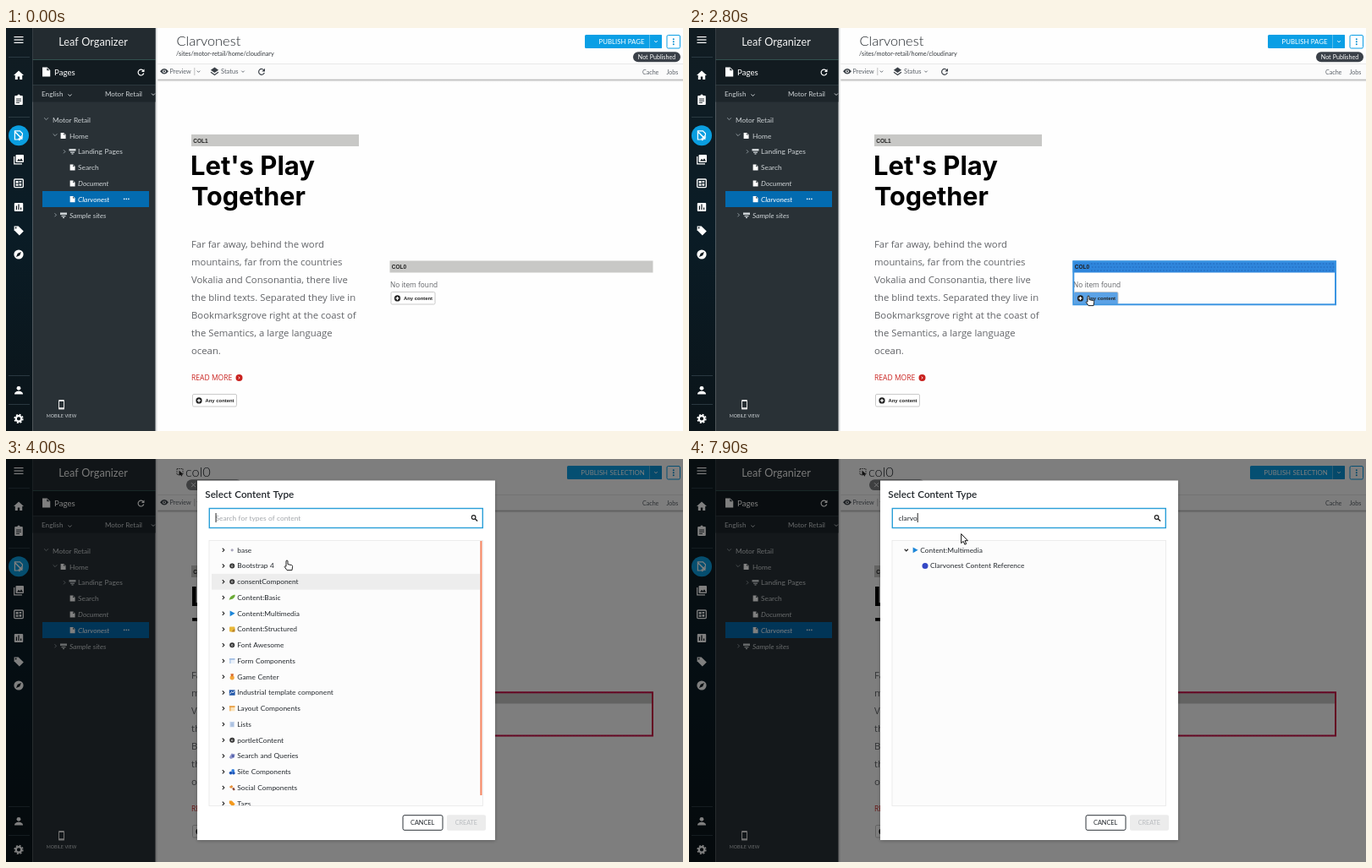
Recreate the animation shown at these times as an HTML page. Size 800 by 477 pixels, loop 8 s.

```html
<!DOCTYPE html>
<html lang="en">
<head>
<meta charset="utf-8">
<title>Content picker</title>
<style>
html, body { margin: 0; width: 100%; height: 100%; overflow: hidden; background: #fff; }
svg { display: block; width: 100%; height: 100%; }
text { font-family: Lato, "Open Sans", sans-serif; word-spacing: .05em; white-space: pre; }
.body { font-family: "Open Sans", "Noto Sans", sans-serif; word-spacing: 0; }
.head { font-family: Inter, sans-serif; font-weight: 700; word-spacing: 0; }
.bold { font-family: "Liberation Sans", Arial, sans-serif; font-weight: 700; word-spacing: 0; }
.it { font-style: italic; }
.semi { font-weight: 600; }
.light { font-weight: 300; }
.mid { text-anchor: middle; }
</style>
</head>
<body>
<svg id="stage" viewBox="0 0 800 477" preserveAspectRatio="none"></svg>
<script>
const LOOP = 8000, ROW = 18.75;
const NAME = 'Clarvonest';

// ---- drawing helpers -------------------------------------------------
const text = (x, y, size, s, fill = '#fff', cls = '', more = '') =>
  `<text x="${x}" y="${y}" font-size="${size}" fill="${fill}" class="${cls}" ${more}>${s}</text>`;
const rect = (x, y, w, h, fill, more = '') =>
  `<rect x="${x}" y="${y}" width="${w}" height="${h}" fill="${fill}" ${more}/>`;
const path = (d, fill, more = '') => `<path d="${d}" fill="${fill}" ${more}/>`;
const line = (d, color, w = 1, more = '') => path(d, 'none', `stroke="${color}" stroke-width="${w}" ${more}`);
const dot = (x, y, r, fill, more = '') => `<circle cx="${x}" cy="${y}" r="${r}" fill="${fill}" ${more}/>`;
const at = (x, y, s) => `<g transform="translate(${x} ${y})">${s}</g>`;
const group = (id, s) => `<g id="${id}">${s}</g>`;
const down = (x, y, c, r = 2, w = 1) => line(`M${x - r} ${y - r / 2}l${r} ${r}l${r} ${-r}`, c, w);
const right = (x, y, c, r = 2, w = 1) => line(`M${x - r / 2} ${y - r}l${r} ${r}l${-r} ${r}`, c, w);
const kebab = (x, y, c) => [-3, 0, 3].map(d => dot(x, y + d, 1, c)).join('');
const page = (x, y, k, fill = '#fff') =>
  at(x, y, `<g transform="scale(${k})">${path('M-3.2-4h4l2.6 2.6V4h-6.6z', fill)}${path('M.6-3.4v2.2h2.2z', '#293136')}</g>`);
const refresh = (x, y, c) => at(x, y, line('M3-1.6A3.4 3.4 0 1 0 3.3 1', c, 1.2) + path('M4-4v3.6h-3.6z', c));
const plus = (x, y, r) => dot(x, y, r, '#222') +
  line(`M${x - r * .55} ${y}h${r * 1.1}M${x} ${y - r * .55}v${r * 1.1}`, '#fff', r * .33);

// ---- left rail and page tree ------------------------------------------
function rail() {
  const w = '#fff';
  const sep = [34, 105, 411, 445].map(y => rect(3, y, 25, .8, '#33424a')).join('');
  return rect(0, 0, 31.5, 477, 'url(#railFill)') + sep +
    [10, 13.4, 16.8].map(y => rect(9.5, y, 11, 1.2, w)).join('') +
    path('M15 50.5l6 5.5h-1.8v5h-3v-3.6h-2.4V61h-3v-5H9z', w) +
    rect(10.2, 80, 9.6, 11, w, 'rx="1"') + dot(15, 80, 1.6, w) +
    line('M12 84h6M12 86.2h6M12 88.4h4', '#0d171d', .9) +
    dot(15, 127.2, 12, '#0a9ee0') +
    path('M10.4 121.8h6l3 3V127l-5 5h-4z', 'none', 'stroke="#fff" stroke-width="1.2"') +
    line('M10.8 123l8.6 8.6M19.8 128.5l-4.5 4.5', w, 1.5) +
    rect(11.5, 150, 9.5, 9, w, 'rx="1"') + line('M9.7 152v8.8H19', w, 1.2) + path('M13 157.4l2-2.6 1.5 1.6 1.5-2.2 2 3.2z', '#0d171d') +
    rect(9.7, 179, 10.6, 9.6, 'none', 'rx="1" stroke="#fff" stroke-width="1.3"') +
    rect(11.6, 181, 3, 2.6, w) + rect(11.6, 184.6, 3, 2.2, w) + rect(15.6, 181, 2.6, 2, w) + rect(15.6, 184, 2.6, 2.8, w) +
    rect(9.8, 207, 10.4, 10, w, 'rx="1"') + line('M12.4 215v-4.5M15 215v-6.4M17.6 215v-2.4', '#0d171d', 1.2) +
    path('M9.6 234.5h5l6.2 6-5 5-6.2-6.2z', w) + dot(11.6, 236.5, .9, '#0d171d') +
    dot(15, 268, 5.6, w) + path('M18 265l-1.8 4.2L12 271l1.8-4.2z', '#0d171d') +
    dot(15, 426.3, 2.4, w) + path('M10 433.4c0-5 10-5 10 0z', w) +
    dot(15, 462.4, 3.2, 'none', 'stroke="#fff" stroke-width="2.2"') +
    dot(15, 462.4, 4.8, 'none', 'stroke="#fff" stroke-width="1.6" stroke-dasharray="2 1.77"');
}

function tree() {
  const c = '#ced3d6', g = '#8e989d';
  const box = (x, y) => rect(x - 4, y - 3, 8, 2.6, c) + rect(x - 2.5, y + .6, 5, 1.2, c) + rect(x - 1, y + 2.4, 2, 1.2, c);
  return rect(31.5, 0, 145, 477, '#293136') + rect(31.5, 0, 145, 37, '#232b30') +
    rect(31.5, 37, 145, 1, '#31504e') + rect(31.5, 38, 145, 29, '#121b20') +
    rect(31.5, 67, 145, 1, '#2c383e') + rect(31.5, 68, 145, 19.5, '#1d252a') +
    text(103, 20.8, 12.7, 'Leaf Organizer', '#f2f2f2', 'mid') +
    page(47.5, 52, 1.4) + text(57, 55.5, 9.7, 'Pages') + refresh(159.5, 52.5, '#fff') +
    text(42, 80.5, 8.2, 'English', c) + down(75.5, 79.5, c) +
    text(117, 80.5, 8, 'Motor Retail', c) + down(174, 78.5, c) +
    down(47.5, 107.5, g, 2.4) + text(55, 111.8, 8.2, 'Motor Retail', c) +
    down(58, 126.5, g, 2.4) + page(67.5, 127.5, .9) + text(75, 130.6, 8.4, 'Home', c) +
    right(69, 146.3, g) + box(78.5, 146) + text(85, 149.4, 8.4, 'Landing Pages', c) +
    page(78.5, 165, .9) + text(85, 168.2, 8.4, 'Search', c) +
    page(78.5, 184, .9) + text(85, 187, 8.4, 'Document', c, 'it') +
    rect(43, 193, 126, 19, '#036bb0') + page(78.5, 202.6, .9) + text(85, 205.7, 8.4, NAME, '#fff', 'it') +
    [139.7, 142.3, 144.9].map(x => dot(x, 202.4, .8, '#fff')).join('') +
    right(58.5, 221.3, g) + box(68, 221.5) + text(75, 224.5, 8.4, 'Sample sites', c, 'it') +
    rect(62, 440, 7, 11.6, '#e4e4e4', 'rx="1.2"') + rect(63, 442, 5, 7.2, '#293136') +
    text(65.5, 460.8, 5.4, 'MOBILE VIEW', c, 'mid');
}

// ---- top bar -----------------------------------------------------------
function topBar() {
  const c = '#5a6068';
  const publish = (x, label, mid, side) =>
    rect(x, 8, 775 - x, 16, '#0a9fe5', 'rx="1.5"') + rect(760.5, 8, 14.5, 16, side, 'rx="1"') +
    rect(760, 8, .7, 16, '#7cc9ee') + text(mid, 18.8, 7.8, label, '#fff', 'mid') + down(768, 16, '#fff', 1.7);
  return rect(176.5, 0, 624, 61, '#fefefe') + rect(179, 42, 621, .8, '#dcdcdc') + rect(179, 42.8, 621, 18.2, '#fbfbfb') +
    rect(176, 60.8, 624, 4, 'url(#barShade)') + rect(176.3, 0, 3, 477, 'url(#edge)') +
    path('M182 51.3q5-6.6 10 0q-5 6.6-10 0z', '#3a4047') + dot(187, 51.3, 1.9, '#fff') + dot(187, 51.3, 1.1, '#3a4047') +
    text(193.5, 53.8, 7.2, 'Preview', c) + rect(222.5, 47, .7, 9, '#aaa') + down(227.5, 51.5, c, 1.7, .9) +
    path('M246.5 46.5l4.6 3.2-4.6 3.2-4.6-3.2z', '#3a4047') + line('M242 52.3l4.5 3.2 4.5-3.2', '#3a4047', 1.2) +
    text(254, 53.8, 7.5, 'Status', c) + down(280, 51.5, c, 1.7, .9) + refresh(302, 51.8, '#3a4047') +
    text(752, 54.6, 7.1, 'Cache', c) + text(780.5, 54.6, 7, 'Jobs', c) +
    rect(781, 8.5, 15.5, 15.5, '#fff', 'rx="1.5" stroke="#0a9ee5" stroke-width="1"') + kebab(788.8, 16.2, '#0a8fd0') +
    group('plainTitle',
      text(201.5, 21, 16.4, NAME, '#22272c', 'light') +
      text(201, 33, 7.25, '/sites/motor-retail/home/cloudinary', '#33383d') +
      publish(684, 'PUBLISH PAGE', 727.5, '#0a9fe5') +
      rect(741, 28.3, 56, 12, '#3a4048', 'rx="6"') + text(769, 36.8, 7.1, 'Not Published', '#fff', 'mid')) +
    group('pickTitle',
      rect(202, 11.5, 7, 7, 'none', 'stroke="#444" stroke-width="1" stroke-dasharray="1.4 1"') +
      path('M204.5 13.5v6.5l1.6-1.4 1.2 2 1-.6-1.1-2h2z', '#222') +
      text(212, 21, 16.4, 'col0', '#22272c', 'light') +
      rect(213, 24.3, 66, 12.7, '#7c7e81', 'rx="6.3"') + line('M219 28.2l5 5M224 28.2l-5 5', '#fff', .9) +
      text(227.8, 33, 6.85, 'Clear Selection') +
      publish(663, 'PUBLISH SELECTION', 717, '#0a93d6'));
}

// ---- page body ---------------------------------------------------------
const anyContent = (x, y, id) => rect(x, y, 52, 14.5, '#fff', `id="${id}" rx="1.5" stroke="#c4c4c4" stroke-width=".9"`) +
  plus(x + 7.5, y + 7.4, 3.6) + text(x + 15, y + 9.5, 5.9, 'Any content', '#222', 'bold');

function content() {
  const lines = ['Far far away, behind the word', 'mountains, far from the countries', 'Vokalia and Consonantia, there live',
    'the blind texts. Separated they live in', 'Bookmarksgrove right at the coast of', 'the Semantics, a large language', 'ocean.'];
  const bar = (x, y, w, id, label) => rect(x, y, w, 14, '#c8c8c6', `id="${id}"`) +
    text(x + 2.3, y + 9.6, 6.5, label, '#222', 'bold');
  const dashes = (x, y, w) => line(`M${x} ${y}h${w}`, '#1d5fb0', .9, 'stroke-dasharray="1.5 2.2"');
  return bar(219, 126, 198, 'bar1', 'COL1') +
    text(218, 174, 31, "Let's Play", '#000', 'head') + text(219, 209.5, 30.5, 'Together', '#000', 'head') +
    lines.map((s, i) => text(219, 259.5 + i * 21.1, 11.33, s, '#626468', 'body')).join('') +
    text(219, 417.2, 8.55, 'READ MORE', '#c9211e', 'body') + dot(275.5, 414, 4, '#c9211e') + right(275.5, 414, '#fff', 1.4, .9) +
    anyContent(220.5, 433.5, 'btn1') +
    bar(453.5, 275.5, 311, 'bar0', 'COL0') +
    text(454, 306.8, 8.3, 'No item found', '#626468', 'body') + anyContent(455, 312.5, 'btn0') +
    group('hover1', dashes(245, 132, 170) + dashes(243, 136, 172) +
      rect(220, 147.5, 196, 275, 'none', 'stroke="#3189dd" stroke-width="1.8"') + dashes(220, 147.5, 196) +
      line('M220 148v274', '#1d5fb0', .7, 'stroke-dasharray="1.5 2.2"') +
      rect(219.3, 147, 11.5, 10.8, '#2f86dc') + line('M225 148.3v8.2M220.8 152.4h8.4', '#fff', 1) +
      path('M225 147.6l1.7 1.9h-3.4zM225 157.2l1.7-1.9h-3.4zM220.2 152.4l1.9-1.7v3.4zM229.8 152.4l-1.9-1.7v3.4z', '#fff')) +
    group('hover0', dashes(475, 279, 288) + dashes(476, 283, 287) + dashes(475, 287, 288) +
      rect(454.3, 276.3, 309.7, 51, 'none', 'stroke="#3b95e2" stroke-width="2"')) +
    group('pick0', rect(454.3, 276.3, 309.7, 51.2, 'none', 'stroke="#d00a3c" stroke-width="2"') +
      rect(454.3, 276.3, 309.7, 51.2, 'none', 'stroke="#9b1fa0" stroke-width=".8" stroke-dasharray="1.5 2.2" opacity=".5"'));
}

// ---- dialog --------------------------------------------------------------
const win = (a, b) => rect(-3.3, -3, 6.6, 6, a) + rect(-3.3, -3, 6.6, 1.6, b) + rect(-3.3, -1.4, 2, 4.4, b, 'opacity=".5"');
const icons = {
  speck: dot(0, 0, 1.6, '#a9a6bd'),
  gear: dot(0, 0, 2.1, '#fff', 'stroke="#333" stroke-width="1.8"') + dot(0, 0, .8, '#333'),
  leaf: path('M-3.5 3.2C-3-1 0-3.2 3.6-3.2C3.4 0 1 2.4-2.4 2.2z', '#6aaa35'),
  play: path('M-2.6-3.4L3.4 0l-6 3.4z', '#1c86d8'),
  cube: rect(-3.2, -3, 6.4, 6, '#e9b839', 'rx="1"') + path('M-1 3l4.2-4V3z', '#b9822a'),
  form: win('#e9f0fa', '#9ab8e0'),
  medal: dot(0, 1, 2.6, '#f3a63a') + path('M-1.8-3.6h3.6l-.6 3h-2.4z', '#d96b2b'),
  plant: rect(-3.4, -3.2, 6.8, 6.4, '#1f55a8') + line('M-2.6 1.8l2-3 1.6 1.6 1.8-2.6', '#fff', .9),
  layout: win('#fbe3b8', '#e79a3c'),
  list: rect(-2.8, -3.3, 5.6, 6.6, '#cfdcf0') + line('M-1.8-1.4h3.6M-1.8.3h3.6M-1.8 2h3.6', '#7f9ccb', .7),
  find: path('M-3.4 1.6L-.6-3l4 1-1 4-4 1.4z', '#8d93c9') + dot(1, 0, 1.4, '#4a5aa8'),
  site: dot(1, -1.4, 1.9, '#2f7fe0') + dot(-1.6, 1.3, 1.9, '#1f57b8') + dot(1.7, 1.5, 1.8, '#1f57b8'),
  people: path('M-3.4-1l3-2 1.6 2-2.4 2z', '#e8913a') + path('M0 1l2-1.4L3.6 2.4 1.6 3.4z', '#8a4a3a'),
  tag: path('M-3.4-3.2h3L3.5.8.6 3.5-3.4-.2z', '#f39a1e'),
  green: dot(0, 0, 1.4, '#7fb653'),
  teal: dot(0, 0, 1.4, '#5cb8a6'),
  mark: dot(0, 0, 3.5, '#3448c5')
};
const media = ['Content:Multimedia', 'play'], ref = [NAME + ' Content Reference', 'mark', 1];
const lists = [
  [['base', 'speck'], ['Bootstrap 4', 'gear'], ['consentComponent', 'gear'], ['Content:Basic', 'leaf'], media,
    ['Content:Structured', 'cube'], ['Font Awesome', 'gear'], ['Form Components', 'form'], ['Game Center', 'medal'],
    ['Industrial template component', 'plant'], ['Layout Components', 'layout'], ['Lists', 'list'], ['portletContent', 'gear'],
    ['Search and Queries', 'find'], ['Site Components', 'site'], ['Social Components', 'people'], ['Tags', 'tag']],
  [['Bootstrap 4', 'gear'], ['Breadcrumb', 'green', 1], ['Card', 'teal', 1], ['Carousel', 'green', 1], ['Media object', 'green', 1],
    ['consentComponent', 'gear'], ['Consent', '', 1], ['Consent Manager Webapp Configuration', '', 1],
    ['Content:Basic', 'leaf'], ['Content reference', '', 1], ['Rich text', '', 1],
    media, ref, ['Dam Content Reference', 'teal', 1], ['File reference', '', 1],
    ['File reference (Multi-Language)', '', 1], ['Image (from the Document Manager)', '', 1]],
  [media, ref]
];
const thumbs = [301, 78, 0];

function listView(rows, n) {
  const items = rows.map(([label, icon, child], i) => {
    const y = 107.8 + i * ROW;
    return (child ? '' : (n ? down : right)(256.8, y, '#222', 2.1, 1.1)) +
      (icon ? at(child ? 279 : 267.2, y, icons[icon]) : '') +
      text(child ? 285 : 273.3, y + 2.9, 8.4, label, '#24292e');
  }).join('');
  return group('list' + n, items + rect(560.4, 97, 2, thumbs[n], '#f4815c'));
}

function dialog() {
  return rect(226, 25.5, 352, 425.5, '#fff', 'filter="url(#drop)"') +
    text(235.3, 46, 11.7, 'Select Content Type', '#1f2429', 'semi') +
    rect(240.3, 58.5, 323, 23, '#fff', 'stroke="#2a9fd8" stroke-width="1.4"') +
    text(247.5, 72.8, 8.35, 'Search for types of content', '#a3a7ab', '', 'id="hint"') +
    text(247.5, 72.8, 8.4, '', '#24292e', '', 'id="typed"') + rect(247.5, 64, .9, 11, '#111', 'id="caret"') +
    dot(552.6, 69, 2.3, 'none', 'stroke="#222" stroke-width="1.2"') + line('M554.3 70.8l2.8 2.8', '#222', 1.4) +
    rect(240, 96.5, 323.5, 314, '#fcfcfc', 'stroke="#eaeaea" stroke-width=".9"') +
    `<g clip-path="url(#listClip)">${rect(243, 0, 317, ROW, '#ededed', 'id="rowHover"')}${lists.map(listView).join('')}</g>` +
    rect(469, 421.7, 47, 17.6, '#fff', 'rx="2" stroke="#2c3238" stroke-width="1"') +
    text(492.2, 433.2, 7.35, 'CANCEL', '#22272c', 'mid') +
    rect(521, 421.2, 46, 18.6, '#ececec', 'rx="2"') + text(543.9, 433.2, 7.2, 'CREATE', '#b9bcbf', 'mid');
}

const cursors =
  group('arrow', path('M0 0v11l2.5-2.2 1.7 3.8 1.8-.8-1.7-3.7h3.4z', '#fff', 'stroke="#111" stroke-width="1"')) +
  group('hand', path('M-1 .6q1-1.3 2 0V4.6l4.6 1q1.2.4 1 1.8L6 11.6H0L-2.8 7.6q.3-1.6 1.8-.4z', '#fff', 'stroke="#222" stroke-width="1"')) +
  group('beam', line('M-2.2-5.4h1.4L0-4.6l.8-.8h1.4M0-4.6v9M-2.2 5.2h1.4L0 4.4l.8.8h1.4M-1.2 1.2h2.4', '#111', 1.2));

const grad = (id, dir, stops) => `<linearGradient id="${id}" x2="${dir ? 0 : 1}" y2="${dir}">` +
  stops.map(([o, c, a = 1]) => `<stop offset="${o}" stop-color="${c}" stop-opacity="${a}"/>`).join('') + '</linearGradient>';

document.getElementById('stage').innerHTML = '<defs>' +
  grad('railFill', 1, [[0, '#111c22'], [.5, '#0a1c26'], [1, '#0b1419']]) +
  grad('barShade', 1, [[0, '#777', .75], [.35, '#aaa', .4], [1, '#fff', 0]]) +
  grad('edge', 0, [[0, '#c9cbcc'], [.5, '#dfe0e1'], [1, '#fefefe']]) +
  '<clipPath id="listClip"><rect x="240" y="97" width="323" height="313"/></clipPath>' +
  '<filter id="drop"><feDropShadow dx="0" dy="1" stdDeviation="2" flood-opacity=".25"/></filter></defs>' +
  rect(0, 0, 800, 477, '#fefefe') + content() + topBar() + tree() + rail() +
  rect(0, 0, 800, 477, '#000', 'id="shade"') + group('dialog', dialog()) + group('cursor', cursors);

// ---- motion ----------------------------------------------------------------
const el = id => document.getElementById(id);
const show = (id, on) => el(id).setAttribute('visibility', on ? 'inherit' : 'hidden');
const set = (id, k, v) => el(id).setAttribute(k, v);
const ease = x => { x = Math.min(1, Math.max(0, x)); return x * x * (3 - 2 * x); };

// time, x, y of the pointer tip
const track = [[900, 330, 490], [1500, 385, 235], [1850, 416, 160], [1950, 416, 160], [2650, 472, 317], [2850, 472, 317],
  [3300, 475, 316], [3550, 475, 316], [4000, 332, 120], [4500, 320, 67], [6850, 320, 67], [7100, 321.7, 88.6]];
const keys = [5250, 5750, 5950, 6200, 6500, 7800];
const PICK = 3100, OPEN = 3350, FADE = 250, FOCUS = 3500, BLINK = 600;

function pointer(t) {
  const i = track.findIndex(k => k[0] > t);
  if (i < 0) return track[track.length - 1].slice(1);
  if (i === 0) return track[0].slice(1);
  const [t0, x0, y0] = track[i - 1], [t1, x1, y1] = track[i], p = ease((t - t0) / (t1 - t0));
  return [x0 + (x1 - x0) * p, y0 + (y1 - y0) * p];
}
const inside = ([x, y], l, t, r, b) => x >= l && x <= r && y >= t && y <= b;

function render(t) {
  const pos = pointer(t), fade = ease((t - OPEN) / FADE), open = fade > .5, picked = t >= PICK;
  const count = keys.filter(k => k <= t).length, shown = Math.min(count, 2);

  const over1 = !open && inside(pos, 219, 126, 417, 423);
  const over0 = !open && inside(pos, 453, 275, 765, 329);
  const onBtn0 = over0 && inside(pos, 455, 312, 507, 327);
  show('hover1', over1);
  show('hover0', over0 && !picked);
  show('pick0', picked);
  set('bar1', 'fill', over1 ? '#2f86dc' : '#c8c8c6');
  set('bar0', 'fill', over0 ? '#2f86dc' : '#c8c8c6');
  set('btn0', 'fill', over0 ? '#5ba2e6' : '#fff');
  show('plainTitle', !picked);
  show('pickTitle', picked);

  set('shade', 'opacity', fade * .5);
  set('dialog', 'opacity', fade);
  show('dialog', fade > 0);
  if (fade > 0) {
    lists.forEach((_, i) => show('list' + i, i === shown));
    // the row highlight trails the pointer a little
    const row = Math.floor((pointer(t - 100)[1] - 98.4) / ROW);
    const hot = open && row >= 0 && row < lists[shown].length;
    show('rowHover', hot);
    if (hot) set('rowHover', 'y', 98.4 + row * ROW);
    show('hint', !count);
    el('typed').textContent = NAME.toLowerCase().slice(0, count);
    set('caret', 'x', 247.6 + (count ? el('typed').getComputedTextLength() : 0));
    const since = t - (count ? keys[count - 1] : FOCUS);
    show('caret', since % (2 * BLINK) < BLINK);
  }

  const kind = open
    ? inside(pos, 240, 58, 564, 82) ? 'beam' : inside(pos, 243, 98, 560, 410) ? 'hand' : 'arrow'
    : onBtn0 ? 'hand' : 'arrow';
  ['arrow', 'hand', 'beam'].forEach(k => show(k, k === kind));
  set('cursor', 'transform', `translate(${pos[0]} ${pos[1]})`);
}

const start = performance.now();
function tick() {
  render((performance.now() - start) % LOOP);
  requestAnimationFrame(tick);
}
tick();
</script>
</body>
</html>
```
